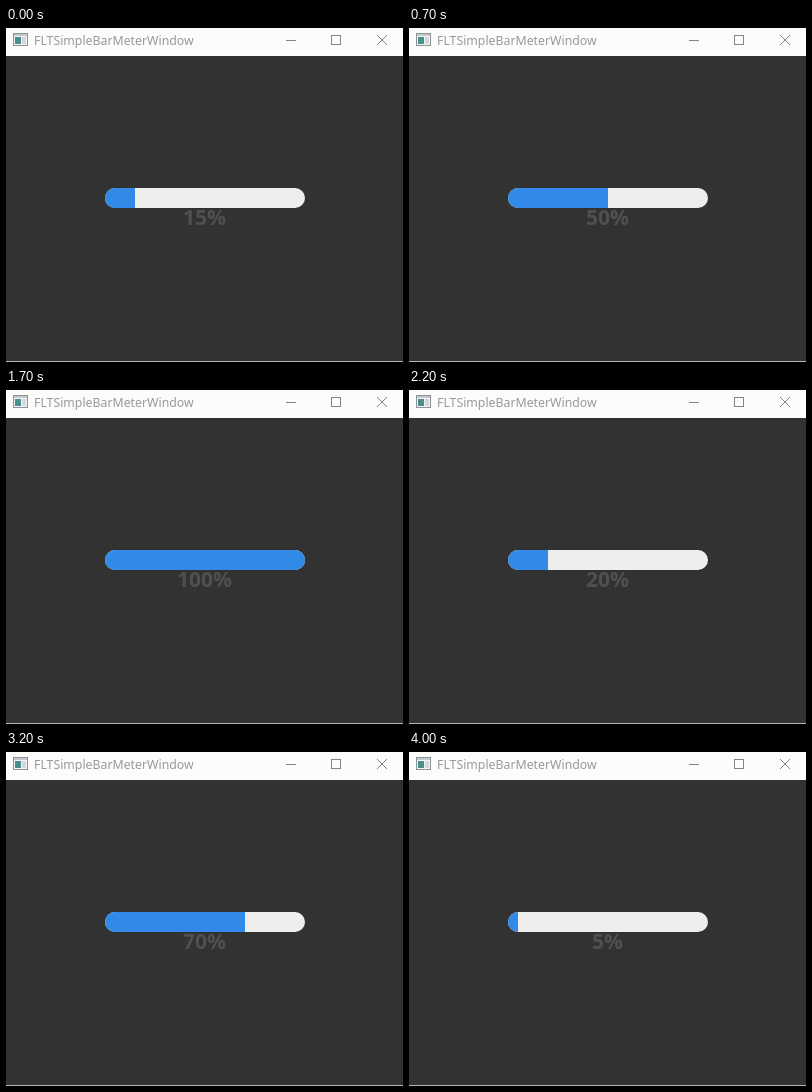
Write an HTML page that moves like this. It is 397 px wide and 334 px high and loops after 4100 ms.

```html
<!DOCTYPE html>
<html lang="en">
<head>
<meta charset="utf-8">
<title>Progress</title>
<style>
  html, body { margin: 0; width: 100%; height: 100%; overflow: hidden; background: #323232; }
  svg { display: block; width: 397px; height: 334px; }
  .title { font: 12.3px "Noto Sans", sans-serif; fill: #999; }
  .percent { font: 700 21px "Open Sans", sans-serif; fill: #505050; text-anchor: middle; }
  .buttons { fill: none; stroke: #858585; }
</style>
</head>
<body>
<svg viewBox="0 0 397 334">
  <defs>
    <clipPath id="pill"><rect x="99" y="160" width="200" height="20" rx="10"/></clipPath>
  </defs>
  <rect width="397" height="334" fill="#323232"/>
  <rect width="397" height="28" fill="#fcfcfa"/>
  <rect y="333" width="397" height="1" fill="#b4b4b4"/>

  <g>
    <rect x="7.5" y="5.5" width="14" height="12" fill="#f4f4f4" stroke="#8c9296"/>
    <rect x="8" y="6" width="13" height="2" fill="#c3c9ce"/>
    <rect x="9" y="9" width="6" height="7" fill="#4b8f8c"/>
    <rect x="16" y="9" width="4" height="7" fill="#d4d8da"/>
  </g>
  <text class="title" x="28" y="17">FLTSimpleBarMeterWindow</text>
  <g class="buttons">
    <path d="M280 12.5h10"/>
    <rect x="325.5" y="7.5" width="9" height="9"/>
    <path d="M371 7l10 10M381 7l-10 10"/>
  </g>

  <text class="percent" id="label" x="198.5" y="197">15%</text>
  <rect x="99" y="160" width="200" height="20" rx="10" fill="#eeeeec"/>
  <g clip-path="url(#pill)">
    <rect id="fill" x="99" y="160" width="30" height="20" fill="#3189e8"/>
  </g>
</svg>
<script>
  const STEP = 100, STEPS = 41;
  const fill = document.getElementById('fill');
  const label = document.getElementById('label');
  const start = performance.now();
  let shown = -1;

  function draw(now) {
    const step = Math.floor(Math.max(0, now - start) / STEP) % STEPS;
    const value = (15 + 5 * step) % 105;
    if (value !== shown) {
      fill.setAttribute('width', value * 2);
      label.textContent = value + '%';
      shown = value;
    }
    requestAnimationFrame(draw);
  }
  draw(start);
</script>
</body>
</html>
```
